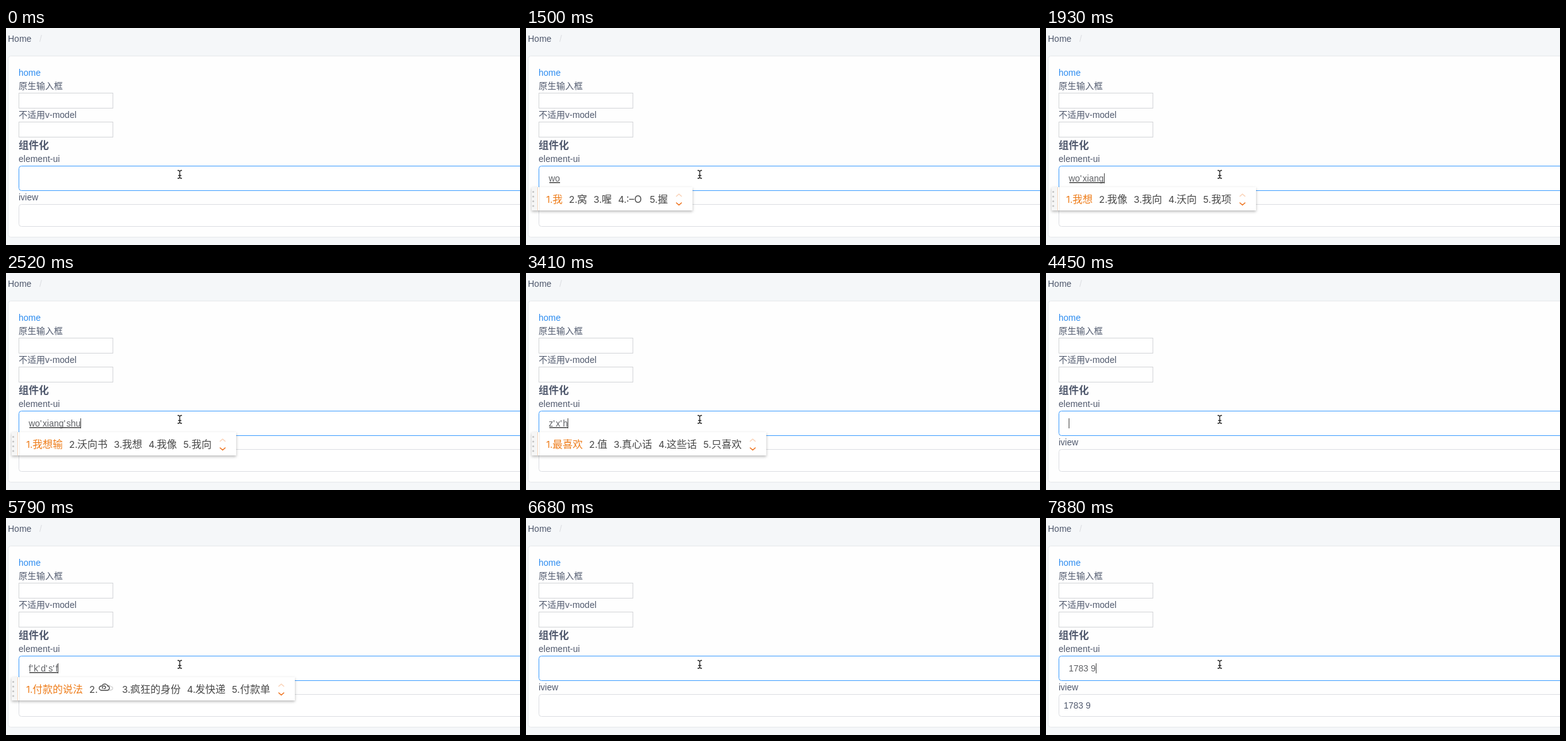
Write an HTML page that moves like this. It is 815 px wide and 345 px high and loops after 8 s.

```html
<!DOCTYPE html>
<html lang="zh-CN">
<head>
<meta charset="utf-8">
<title>Input method demo</title>
<style>
html, body { margin: 0; width: 100%; height: 100%; overflow: hidden; background: #f5f7f9; }
svg { display: block; width: 815px; height: 345px; }
text { font: 14px "Liberation Sans", "Noto Sans CJK SC", "Noto Sans CJK", sans-serif; fill: #515a6e; white-space: pre; }
.title { font-size: 16px; font-weight: bold; }
#typed { fill: #606266; }
.sep { letter-spacing: 1.5px; }
#list text { font: 16px Inter, "Noto Sans CJK SC", "Noto Sans CJK", sans-serif; fill: #484848; }
#list .num { font-size: 15px; }
#list .first { fill: #ee7d1b; }
.box { fill: #fff; stroke: #d3d5d8; }
.line { fill: none; stroke-linecap: round; stroke-linejoin: round; }
</style>
</head>
<body>
<svg viewBox="0 0 815 345">
  <defs>
    <filter id="shadow" x="-10%" y="-30%" width="120%" height="170%">
      <feDropShadow dx="0" dy="2" stdDeviation="2" flood-color="#000" flood-opacity=".28"/>
    </filter>
  </defs>
  <rect width="815" height="345" fill="#f5f7f9"/>
  <text x="3" y="22">Home</text>
  <text x="53" y="22" style="fill:#dcdee2">/</text>
  <rect x="3.5" y="44.5" width="830" height="288" rx="4" fill="#fefefe" stroke="#e6e8eb"/>
  <text x="20" y="76" style="fill:#2d8cf0">home</text>
  <text x="20" y="97">原生输入框</text>
  <rect class="box" x="20.5" y="103.5" width="149" height="24"/>
  <text x="20" y="143">不适用v-model</text>
  <rect class="box" x="20.5" y="149.5" width="149" height="24"/>
  <text class="title" x="20" y="192">组件化</text>
  <text x="20" y="213">element-ui</text>
  <rect class="box" x="20.5" y="219.5" width="820" height="39" rx="4" style="stroke:#409eff"/>
  <text x="20" y="274">iview</text>
  <rect class="box" x="20.5" y="280.5" width="820" height="35" rx="4" style="stroke:#dcdee2"/>

  <text id="typed" x="36" y="244"></text>
  <rect id="under" x="37" y="245" height="1.5" fill="#444"/>
  <rect id="caret" y="231" width="1" height="16" fill="#444"/>
  <text id="mirror" x="28" y="303"></text>

  <g id="popup">
    <rect id="panel" x="9" y="253" height="37" fill="#fff" filter="url(#shadow)"/>
    <rect x="9" y="253" width="10" height="37" fill="#f6f6f6"/>
    <path d="M18.5 253v37" stroke="#f6d5bd"/>
    <path d="M21.5 253v37" stroke="#ededed"/>
    <path class="line" d="M11.5 260.5v.01M11.5 268v.01M11.5 275.5v.01M11.5 283v.01" stroke="#c4c4c4" stroke-width="3"/>
    <g id="list"></g>
    <g id="arrows" class="line" stroke-width="1.6">
      <path d="M-4 267.500L0 264L4 267.500" stroke="#fad3b9"/>
      <path d="M-4 278L0 281.500L4 278" stroke="#ee7420"/>
    </g>
  </g>

  <g class="line">
    <path id="beam" d="M272.500 226.500h1.500l1.500 1.500l1.500-1.500h1.500M275.500 228v9.500M272.500 239h1.500l1.500-1.500l1.500 1.500h1.500M273.500 234.500h4" stroke="#fff" stroke-width="3"/>
    <use href="#beam"/>
    <path d="M272.500 226.500h1.500l1.500 1.500l1.500-1.500h1.500M275.500 228v9.500M272.500 239h1.500l1.500-1.500l1.500 1.500h1.500M273.500 234.500h4" stroke="#222" stroke-width="1.300"/>
  </g>
</svg>
<script>
const LOOP = 8000;
const CLOUD = '@';

// [start ms, typed text, candidates, caret hidden]
const steps = [
  [0, '', '', true],
  [300, ''],
  [750, 'w', '我 为 问 无 玩'],
  [900, 'wo', '我 窝 喔 :–O 握'],
  [1500, 'wo', '我 窝 喔 :–O 握', true],
  [1640, "wo'x", '我想 我先 我行 我写 我下'],
  [1790, "wo'xi", '我喜 我系 我洗 卧席 我'],
  [1930, "wo'xiang", '我想 我像 我向 沃向 我项'],
  [2230, "wo'xiang's", '我想说 我想 我像 我向 沃向'],
  [2380, "wo'xiang'sh", '我想是 我像是 我想 我像 我向'],
  [2520, "wo'xiang'shu", '我想输 沃向书 我想 我像 我向'],
  [2670, "wo'xiang'shu'r", '我想输入 我想输 我想 我像 我向'],
  [2820, "wo'xiang'shu'ru", '我想输入 沃向书如 我想 我像 我向'],
  [2970, "wo'xiang'shu'ru'z", '我想输入在 我想输 我想 我像 我向'],
  [3110, "wo'xiang'shu'ru'zh", '我想输入这 我想输 我想 我像 我向'],
  [3260, ''],
  [3410, "z'x'h", '最喜欢 值 真心话 这些话 只喜欢'],
  [3560, "z'x'h'd", '最喜欢的 真心话的 值 最喜欢 只喜欢'],
  [3710, "z'x'h'd's", '最喜欢的是 最喜欢的 最喜欢 值 只'],
  [3860, "z'x'h'd's'k", '最喜欢的时刻 最喜欢的 最喜欢 值 只'],
  [4010, "z'x'h'd's'k'h", '最喜欢的时刻和 最喜欢 值 只 在'],
  [4160, "z'x'h'd's'k'h'f", '最喜欢的时候 最喜欢的 值 只 在'],
  [4450, ''],
  [5050, '', '', true],
  [5500, "f'k", '反馈 付款 疯狂 分开 放开'],
  [5650, "f'k'd's", '付款的是 疯狂的 发快递 付款 反馈'],
  [5790, "f'k'd's'f", `付款的说法 ${CLOUD} 疯狂的身份 发快递 付款单`],
  [5940, "f'k'd's'f'j", '付款的说法就 疯狂的身份 付款的 发快递 付款单'],
  [6085, "f'k'd's'f'j'h", '付款的说法就会 疯狂的身份 发快递 付款 反馈'],
  [6230, ''],
  [6680, '', '', true],
  [6980, '1'],
  [7280, '17'],
  [7580, '178'],
  [7880, '1783 9']
];

const $ = id => document.getElementById(id);

function add(parent, tag, attrs, text = '') {
  const el = document.createElementNS('http://www.w3.org/2000/svg', tag);
  for (const key in attrs) el.setAttribute(key, attrs[key]);
  el.textContent = text;
  parent.append(el);
  return el;
}

function drawCloud(x) {
  const g = add($('list'), 'g', { class: 'line', transform: `translate(${x} 263)` });
  add(g, 'path', { d: 'M14 4q3-2 5 1q4 0 3 4q-1 2-7 2', stroke: '#c8c8c8', 'stroke-width': 1.2 });
  add(g, 'path', { d: 'M4 11q-4-1-3-5q1-2 4-2q2-4 6-3q3 1 3 3q3 0 3 4q-1 3-4 3zM6 8q-1-3 2-4q3 0 3 3q-1 2-3 1', stroke: '#484848', 'stroke-width': 1.3 });
}

const itemWidth = item => item === CLOUD ? 29 : item[0] === ':' ? 27 : item.length * 16;

function drawPopup(items) {
  $('popup').style.display = items ? '' : 'none';
  $('list').replaceChildren();
  if (!items) return;
  let x = 32;
  items.split(' ').forEach((item, i) => {
    const tone = i ? '' : 'first';
    add($('list'), 'text', { class: `num ${tone}`, x, y: 278 }, `${i + 1}.`);
    x += i ? 13 : 10;
    if (item === CLOUD) drawCloud(x + 2);
    else add($('list'), 'text', { class: tone, x, y: 278 }, item);
    x += itemWidth(item) + 10;
  });
  const end = x - 10;
  $('arrows').setAttribute('transform', `translate(${end + 17.5})`);
  $('panel').setAttribute('width', end + 39 - 9);
}

function drawTyped(text, composing, hidden) {
  const typed = $('typed');
  typed.replaceChildren();
  for (const part of text.split(/(')/))
    if (part) add(typed, 'tspan', part === "'" ? { class: 'sep' } : {}, part);
  const width = text ? Math.round(typed.getComputedTextLength()) : 0;
  $('under').setAttribute('width', composing ? Math.max(0, width - 1) : 0);
  $('caret').setAttribute('x', 36 + width);
  $('caret').style.display = hidden ? 'none' : '';
  $('mirror').textContent = composing ? '' : text;
}

let shown = -1;
function frame(now) {
  const t = now % LOOP;
  const i = steps.findLastIndex(step => step[0] <= t);
  if (i !== shown) {
    const [, text, items, hidden] = steps[shown = i];
    drawTyped(text, !!items, hidden);
    drawPopup(items);
  }
  requestAnimationFrame(tick);
}

let start;
function tick(now) {
  start ??= now;
  frame(Math.max(0, now - start));
}
frame(0);
</script>
</body>
</html>
```
